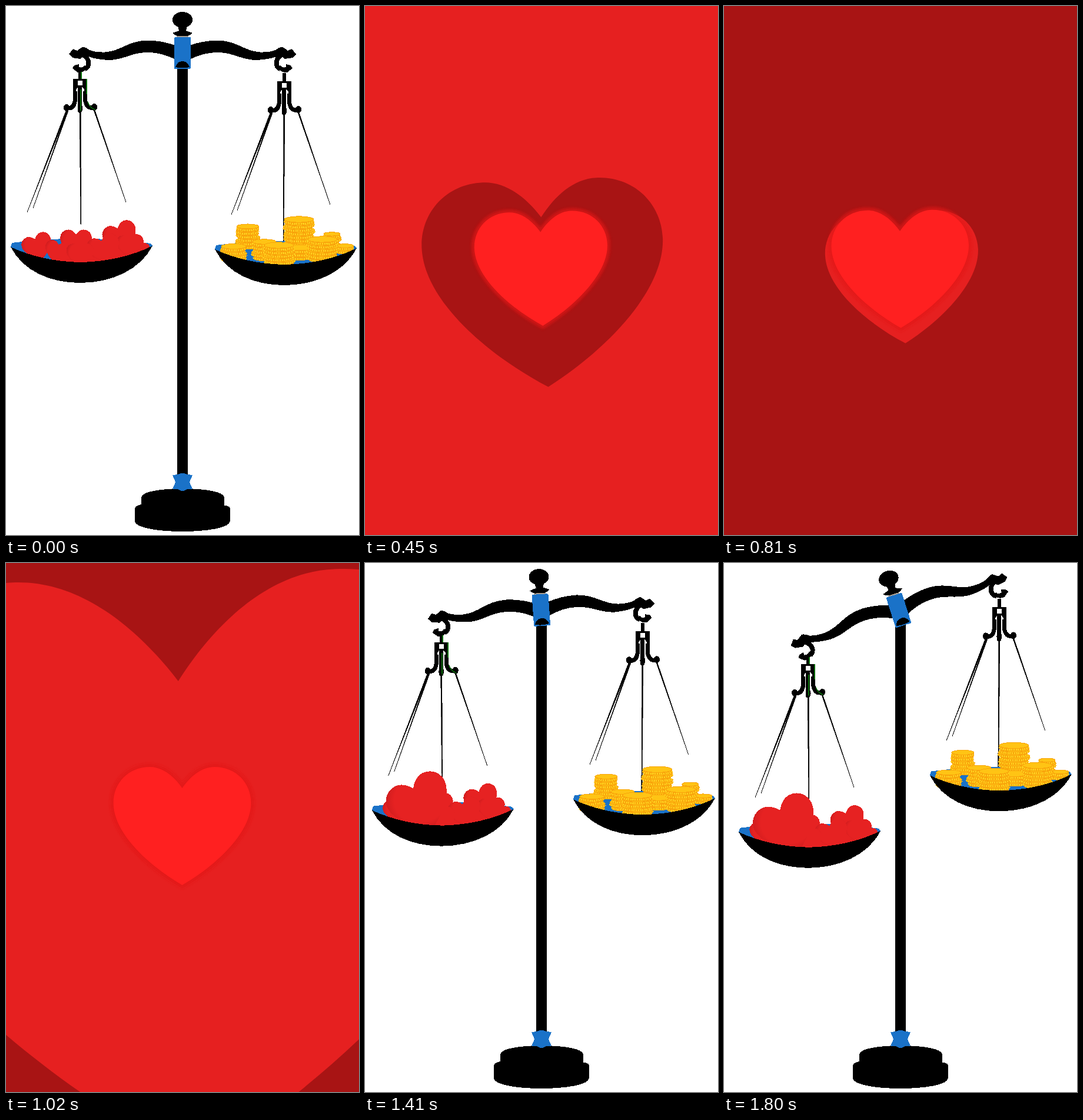
An HTML page for the animation above (1.83 s loop, 600 by 900 pixels).

```html
<!DOCTYPE html>
<html lang="en">
<head>
<meta charset="utf-8">
<title>Hearts and coins</title>
<style>
  html, body { margin: 0; width: 100%; height: 100%; overflow: hidden; background: #fff; }
  svg { display: block; width: 100vw; height: 100vh; }
  .side, .middle { stroke: #000; stroke-width: .7; }
</style>
</head>
<body>
<svg viewBox="0 0 600 900">
  <defs>
    <!-- Heart 234 wide, origin at its visual centre -->
    <path id="heart" d="M0-49C-14-69-33-85-55-85C-92-85-117-57-117-24C-117 26-60 81 0 116C60 81 117 26 117-24C117-57 92-85 55-85C33-85 14-69 0-49Z"/>
    <radialGradient id="shade" cx=".56" cy=".4" r=".62">
      <stop offset=".72" stop-color="#e62222"/>
      <stop offset="1" stop-color="#cb1b1d"/>
    </radialGradient>
    <filter id="soft" x="-20%" y="-20%" width="140%" height="140%"><feGaussianBlur stdDeviation="2"/></filter>
    <g id="arm">
      <path d="M107 82L114 73L121 76L130 69.500Q136 70 142 75Q152 79 168 78.500C195 77 207 59 241 58.500Q265 59 288 67V91Q264 79 241 79C213 79 201 91.500 175 92Q155 91 143 87L134 84L126 90L113 88Z"/>
      <path d="M131 83C143 90 143 104 134 107" fill="none" stroke="#000" stroke-width="8"/>
      <path d="M139 105Q132 114 122 113L113 106L116 101L124 99L124 104Q131 106 133 101Z"/>
    </g>
    <g id="hanger">
      <rect x="123" y="110" width="6" height="16"/>
      <path fill-rule="evenodd" d="M114 124H138V150H133V142L129 137V180Q126 184 122 180V138L119 143V150H114ZM122 127V135H130V127Z"/>
      <path d="M117.500 145V160Q116 175 104 174M134.500 145V160Q137 175 149 173" fill="none" stroke="#000" stroke-width="7"/>
      <ellipse cx="103" cy="173" rx="5" ry="6"/><ellipse cx="150" cy="172" rx="5" ry="6"/>
      <ellipse cx="126" cy="174" rx="4.500" ry="7"/>
    </g>
    <path id="sideStrings" d="M102 178H105L36 351ZM104 178H106L46 344ZM149 177H151L204 334Z"/>
    <path id="panBack" fill="#1a72c8" d="M8 410L10 403Q128 388 246 404L249 408Q200 437 128 438Q55 437 8 410Z"/>
    <path id="panFront" d="M8 410Q62 435 128 436Q196 434 249 408C229 448 180 471 126 471C75 471 29 451 8 410Z"/>
  </defs>

  <g id="scene" shape-rendering="crispEdges">
    <path d="M291 95H309V802H291Z"/>
    <path d="M230 836C230 816 371 816 371 836V850Q381 850 381 856V876C381 900 219 900 219 876V856Q219 850 230 848Z"/>
    <path fill="#1a72c8" d="M283 798L292 797Q300 793 308 797L317 798L312 810L317 822L308 822Q300 828 292 822L283 822L288 810Z"/>
    <g id="beam">
      <use href="#arm"/>
      <use href="#arm" transform="translate(600) scale(-1 1)"/>
      <ellipse cx="300" cy="23.500" rx="17" ry="13.500"/>
      <path d="M292 34H308L306 42L317 46Q312 52 300 52Q288 52 283 46L294 42Z"/>
      <rect x="290" y="51" width="20" height="3" fill="#a99f94"/>
      <rect x="286" y="53" width="28" height="54" rx="2" fill="#1a72c8"/>
      <path d="M288 104Q291 94 300 94Q309 94 312 104Q300 107 288 104Z"/>
    </g>
    <g id="left">
      <use href="#hanger"/>
      <path d="M137 124V150M128 112V124M127 142V180M139 163Q141 172 152 177" fill="none" stroke="#087008" stroke-width="1.500"/>
      <use href="#sideStrings" class="side"/>
      <path class="middle" d="M125 178H127L128 371H127Z"/>
      <use href="#panBack"/>
      <g id="pile"></g>
      <use href="#panFront"/>
    </g>
    <g id="right">
      <use href="#hanger"/>
      <use href="#sideStrings" class="side"/>
      <path class="middle" d="M125 178H127L125 396H124Z"/>
      <use href="#panBack"/>
      <g id="coins"></g>
      <use href="#panFront"/>
    </g>
  </g>
  <g id="waves"></g>
  <g id="hero">
    <use id="glow" href="#heart" fill="none" stroke="#e21616" stroke-width="10" opacity=".65" filter="url(#soft)"/>
    <use href="#heart" fill="#ff2020"/>
  </g>
</svg>
<script>
const LOOP = 1830, STEP = 30, CUT = 1110, LAND = 1320;
const $ = id => document.getElementById(id);

function add(parent, tag, attrs) {
  const el = document.createElementNS('http://www.w3.org/2000/svg', tag);
  for (const key in attrs) el.setAttribute(key, attrs[key]);
  return parent.appendChild(el);
}
const place = (x, y, scale, turn) => `translate(${x} ${y}) rotate(${turn}) scale(${scale})`;
const show = (el, on) => el.setAttribute('display', on ? 'inline' : 'none');
const mix = (a, b, u) => a + (b - a) * u;

const addHeart = (...pose) =>
  add($('pile'), 'use', { href: '#heart', fill: 'url(#shade)', transform: place(...pose) });
[[119, 400, .23, 0], [194, 390, .25, -20], [104, 422, .2, 0], [150, 422, .2, 0], [192, 418, .2, 0],
 [53, 407, .22, -20], [88, 416, .19, 12], [228, 415, .14, 0], [211, 406, .2, -5],
 [166, 411, .24, -18], [126, 421, .2, 0]]
  .forEach(pose => addHeart(...pose));
const landed = addHeart(88, 393, .46, -26);

// A stack of coins, drawn from the bottom up
function stack(cx, top, rx, count) {
  const ry = rx * .18 + .6, thick = 6;
  for (let i = count - 1; i >= 0; i--) {
    const x = cx + (i ? Math.sin(i * 2.4 + cx) * 1.8 : 0), y = top + i * thick;
    const side = `M${x - rx} ${y}V${y + thick - 1}A${rx} ${ry} 0 0 0 ${x + rx} ${y + thick - 1}V${y}Z`;
    add($('coins'), 'path', { d: side, fill: '#f9a50b' });
    add($('coins'), 'path', {
      d: `M${x - rx} ${y + 2.5}A${rx} ${ry} 0 0 0 ${x + rx} ${y + 2.5}`,
      fill: 'none', stroke: '#ffd21f', 'stroke-width': 3, 'stroke-dasharray': '2 1.6'
    });
    add($('coins'), 'ellipse', { cx: x, cy: y, rx, ry, fill: '#ffc414', stroke: '#f9a50b' });
  }
}
[[64, 371, 19, 6], [151, 359, 25, 9], [207, 384, 14, 5], [92, 397, 20, 5], [152, 407, 24, 3],
 [40, 405, 21, 4], [229, 404, 15, 2], [191, 393, 25, 6], [117, 403, 25, 6]]
  .forEach(s => stack(...s));

// Each wave widens with the square of its age
const waves = [[30, .118, '#e62020'], [214, .0858, '#a81414'], [622, .0858, '#e62020']]
  .map(([start, speed, fill]) => ({ start, speed, el: add($('waves'), 'use', { href: '#heart', fill }) }));

function draw(t) {
  const beating = t >= STEP && t < CUT;
  const flying = t >= CUT && t < LAND;

  // Balance
  const tilt = Math.max(0, t - 1300) * .0352;
  const lift = Math.sin(tilt * Math.PI / 180);
  $('beam').setAttribute('transform', `rotate(${-tilt} 300 90)`);
  $('left').setAttribute('transform', `translate(${tilt * .97} ${lift * 158})`);
  $('right').setAttribute('transform', `translate(${347 - tilt * .29} ${4 - lift * 174})`);
  document.querySelectorAll('.side').forEach(el => show(el, !flying));
  document.querySelectorAll('.middle').forEach(el =>
    el.setAttribute('transform', flying ? 'translate(0 143) scale(1 .2)' : ''));
  show(landed, t >= LAND);

  // Expanding hearts
  show($('waves'), beating);
  for (const { start, speed, el } of waves) {
    const width = (Math.max(0, t - start) * speed) ** 2;
    el.setAttribute('transform', place(303, 445, width / 234, -2.4));
  }

  // Bright heart: grows in the middle, then drops into the left pan
  show($('hero'), beating || flying);
  show($('glow'), beating);
  if (beating) {
    const size = 1 - Math.exp(-(t - 15) / 128);
    const turn = -2.6 * Math.max(0, 1 - t / 1020);
    $('hero').setAttribute('transform', place(299.5, 432, size, turn));
  } else if (flying) {
    const u = (t - 1080) / (LAND - 1080), e = u * u;
    $('hero').setAttribute('transform',
      place(mix(300, 88, e), mix(432, 393, e), mix(1, .46, e * u), -26 * e));
  }
}

const origin = performance.now();
function tick() {
  const t = (performance.now() - origin) % LOOP;
  draw(Math.floor(t / STEP) * STEP);
  requestAnimationFrame(tick);
}
draw(0);
requestAnimationFrame(tick);
</script>
</body>
</html>
```
